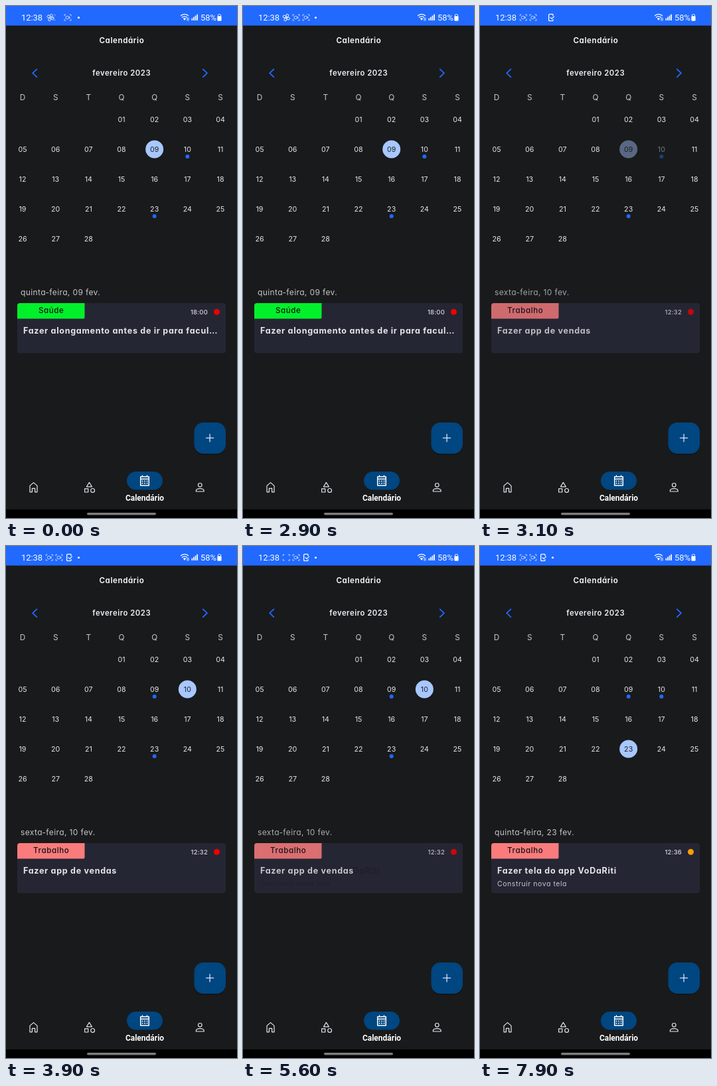
These frames come from a looping animation (348 px wide and 772 px high, 8000 ms). An HTML page:

```html
<!DOCTYPE html>
<html lang="pt">
<head>
<meta charset="utf-8">
<title>Calendário</title>
<style>
html, body { margin: 0; width: 100%; height: 100%; overflow: hidden; background: #191a1c; }
svg { display: block; width: 100vw; height: 100vh; }
text { font-family: Inter, "Open Sans", sans-serif; font-feature-settings: "cv11"; white-space: pre; }
.sys { font-family: Roboto, Arial, sans-serif; }
.line { fill: none; stroke-linecap: round; stroke-linejoin: round; }
</style>
</head>
<body>
<svg id="stage" viewBox="0 0 348 772" preserveAspectRatio="none"></svg>
<script>
const LOOP = 8000, STEP = 100;
const BLUE = '#2169ff', INK = '#e6e6ea', PILL = '#004680', SOFT = '#d6e2ff';
const stage = document.getElementById('stage');
const $ = id => document.getElementById(id);

const text = (x, y, size, s, fill = INK, more = '') =>
  `<text x="${x}" y="${y}" font-size="${size}" fill="${fill}" ${more}>${s}</text>`;
const rect = (x, y, w, h, r, fill, more = '') =>
  `<rect x="${x}" y="${y}" width="${w}" height="${h}" rx="${r}" fill="${fill}" ${more}/>`;
const circle = (x, y, r, fill, more = '') =>
  `<circle cx="${x}" cy="${y}" r="${r}" fill="${fill}" ${more}/>`;
const line = (d, color = INK, width = 1.2) =>
  `<path class="line" d="${d}" stroke="${color}" stroke-width="${width}"/>`;
const group = (id, body) => `<g id="${id}">${body}</g>`;
const mid = 'text-anchor="middle"';

const tasks = [
  { day: 9, date: 'quinta-feira, 09 fev.', tag: 'Saúde', color: '#02f02b', time: '18:00',
    dot: '#ee0000', title: 'Fazer alongamento antes de ir para facul…', note: '' },
  { day: 10, date: 'sexta-feira, 10 fev.', tag: 'Trabalho', color: '#fa7b7c', time: '12:32',
    dot: '#ee0000', title: 'Fazer app de vendas', note: '' },
  { day: 23, date: 'quinta-feira, 23 fev.', tag: 'Trabalho', color: '#fa7b7c', time: '12:36',
    dot: '#ff9d00', title: 'Fazer tela do app VoDaRiti', note: 'Construir nova tela' }
];
// Each tap moves the selection to the next task.
const taps = [2950, 5550];

const colX = i => 25 + i * 49.67;

function statusBar() {
  const corners = 'M-5 -2.6V-4.4H-3.2 M3.2 -4.4H5V-2.6 M5 2.6V4.4H3.2 M-3.2 4.4H-5V2.6';
  const camera = rect(-2.8, -2, 4.2, 4, 1, 'none', `stroke="${SOFT}" stroke-width=".9"`) +
    line('M1.6 -.4L3 -1.3V1.3L1.6 .4', SOFT, .8);
  const petal = a => `<ellipse cx="1.5" cy="-3" rx="1.8" ry="2.2" fill="none" stroke="#fff" stroke-width="1" transform="rotate(${a})"/>`;
  const bars = [0, 1, 2, 3].map(i =>
    rect(279.5 + i * 2.6, 18.5 - i * 2, 1.7, 3.2 + i * 2, .3, '#fff')).join('');
  return rect(0, 0, 348, 29.5, 0, BLUE) +
    text(23, 21.8, 12.9, '12:38', '#fff', 'class="sys"') +
    group('wheel', [0, 90, 180, 270].map(petal).join('') + circle(0, 0, .9, '#fff')) +
    group('rec', line(corners, SOFT, .9) + group('blink', camera)) +
    group('cast', line(corners, SOFT, .9) + camera) +
    group('phone', line('M3 -2.6V-4.2Q3 -5 2 -5H-2.2Q-3.4 -5 -3.4 -4V4Q-3.4 5 -2.2 5H2Q3 5 3 4.2V3', '#fff', 1.3) +
      line('M-1 0L1 2L4.6 -1.5', '#fff', 1.1)) +
    group('more', circle(109.5, 17.5, 1.6, '#fff')) +
    line('M263.5 14.6Q269 10.3 274.5 14.6 M265.4 17Q269 14.2 272.6 17', '#fff', 1.3) +
    `<path d="M266.8 18.8Q269 17.2 271.2 18.8L269 21.8Z" fill="#fff"/>` +
    line('M273 18V22 M275 22V18', '#fff', .9) + bars +
    text(293, 21.8, 13, '58%', '#fff', 'class="sys"') +
    rect(318.4, 15.2, 6.2, 7.3, 1.2, '#fff') +
    rect(319.4, 12.6, 4.2, 4, 1, 'none', 'stroke="#fff" stroke-width=".9"');
}

function calendar() {
  let out = text(174.4, 55.7, 11.6, 'Calendário', '#fff', `${mid} font-weight="600" letter-spacing=".58"`) +
    text(174.2, 105, 11.3, 'fevereiro 2023', '#f0f0f4', `${mid} font-weight="600" letter-spacing=".55"`) +
    line('M46.4 95.3L40.2 101.2L46.4 107.1', BLUE, 1.8) +
    line('M296.8 95.3L303 101.2L296.8 107.1', BLUE, 1.8);
  [...'DSTQQSS'].forEach((d, i) => out += text(colX(i), 142, 11.8, d, '#c8c8cc', mid));
  for (let d = 1; d <= 28; d++) {
    const x = colX((d + 2) % 7), y = 171 + 45 * Math.floor((d + 2) / 7);
    const label = text(x, y + 3.9, 10.7, String(d).padStart(2, '0'), INK, `${mid} id="num${d}"`);
    out += tasks.some(k => k.day === d)
      ? group('day' + d, circle(x, y, 13.5, '#a8c7fe', `id="ring${d}"`) + label +
          circle(x, y + 11, 3, BLUE, `id="mark${d}"`))
      : label;
  }
  return out;
}

const titleStyle = 'font-weight="700" letter-spacing=".72"';
const noteStyle = 'letter-spacing=".55"';

function card(k, i) {
  return group('card' + i,
    text(22, 436, 12, k.date, '#c6c6ca', 'letter-spacing=".38"') +
    `<path d="M17 471.5V452Q17 448 21 448H118.5V469.5Q118.5 471.5 116.5 471.5Z" fill="${k.color}"/>` +
    text(68.2, 463.2, 11.5, k.tag, '#101114', `${mid} font-weight="500" letter-spacing=".65"`) +
    text(304, 464.6, 9.5, k.time, '#d8d8e0', 'text-anchor="end" font-weight="500" letter-spacing=".2"') +
    circle(317.5, 461.3, 4.5, k.dot) +
    text(26, 494, 12.5, k.title, INK, titleStyle) +
    text(26, 512.6, 10.5, k.note, '#c4c5cf', noteStyle));
}

const ghost = (k, i) => group('ghost' + i,
  text(26, 494, 12.5, k.title, '#1b1c26', titleStyle) +
  text(26, 512.6, 10.5, k.note, '#1b1c26', noteStyle));

function bottomBar() {
  const dots = [0, 1, 2, 3, 4, 5].map(i =>
    rect(204.7 + (i % 3) * 3.5, 715.5 + Math.floor(i / 3) * 3.3, 1.7, 1.7, 0, '#fff')).join('');
  return rect(283.5, 630, 47.5, 47, 14, '#111214', 'opacity=".6"') +
    rect(283.5, 628, 47.5, 47, 14, PILL) +
    line('M301.5 651.3H312.7 M307.1 645.7V656.9', '#d4e4ff', 1.3) +
    line('M36 732.8V723.4L41.5 718.6L47 723.4V732.8H43.6V727.4H39.4V732.8Z') +
    line('M125.4 718.4L129.4 724.8H121.4Z M118.6 727.8H123.8V733H118.6Z') +
    circle(130.6, 730.4, 2.9, 'none', `stroke="${INK}" stroke-width="1.2"`) +
    rect(182, 702, 54, 27.5, 13.75, PILL) +
    line('M202.7 709.8H215.3V723H202.7Z M202.7 713.2H215.3 M205.5 708V709.6 M212.5 708V709.6', '#fff', 1.5) + dots +
    text(209, 746, 12, 'Calendário', '#fff', `${mid} class="sys" font-weight="700"`) +
    circle(292.3, 722.3, 2.8, 'none', `stroke="${INK}" stroke-width="1.2"`) +
    line('M286.4 732V730.6Q286.8 727.6 292.3 727.6Q297.8 727.6 298.2 730.6V732Z') +
    rect(0, 759, 348, 13, 0, '#000') + rect(122, 764, 104, 3.4, 1.7, '#7c7c7c');
}

stage.innerHTML = rect(0, 0, 348, 772, 0, '#191a1c') + calendar() +
  rect(17, 448, 314, 75.5, 4, '#252633') +
  tasks.map(ghost).join('') + tasks.map(card).join('') + bottomBar() + statusBar();

const clamp = v => Math.max(0, Math.min(1, v));
const ramp = (t, a, b) => clamp((t - a) / (b - a));
const mix = (a, b, k) => a + (b - a) * k;
const fade = (id, v) => $(id).setAttribute('opacity', v);
const place = (id, x) => $(id).setAttribute('transform', `translate(${x} 17.4)`);

function drawStatus(t) {
  const enter = 1 - (1 - ramp(t, 0, 500)) ** 2;
  const leave = ramp(t, 2900, 3100);
  const push = ramp(t, 3100, 3300);
  place('wheel', mix(67, 65.3, enter));
  fade('wheel', mix(.8, 1, enter) * (1 - leave));
  place('rec', mix(mix(69, 80, enter), 65.3, leave));
  fade('rec', mix(.5, 1, enter));
  place('cast', mix(mix(93, 95, enter), 80, leave));
  place('phone', mix(107, 95, push));
  fade('phone', ramp(t, 2950, 3100));
  fade('more', t >= 3000 && t < 3300 ? 0 : 1);
  fade('blink', Math.floor((t + 100) / 500) % 2 ? 0 : 1);
}

function drawTasks(t) {
  const tap = t >= taps[1] ? 1 : 0;
  const age = t - taps[tap];
  const shown = tap + (age >= 100 ? 1 : 0);
  const picked = tap + (age >= 200 ? 1 : 0);
  const alpha = age < 100 ? mix(1, .7, ramp(age, 0, 100)) : mix(.6, 1, ramp(age, 100, 200));
  tasks.forEach((k, i) => {
    fade('card' + i, i === shown ? alpha : 0);
    fade('ghost' + i, i === tap + 1 && age >= 0 && age < 100 ? .6 : 0);
    const on = i === picked;
    let a = 1;
    if (age >= 100 && age < 350 && (i === tap || i === tap + 1)) {
      a = mix(.45, 1, ramp(age, 200, 350));
    }
    fade('day' + k.day, a);
    fade('ring' + k.day, on ? 1 : 0);
    fade('mark' + k.day, on ? 0 : 1);
    $('num' + k.day).setAttribute('fill', on ? '#1b2230' : INK);
  });
}

function draw(ms) {
  const t = Math.floor((ms % LOOP) / STEP) * STEP;
  drawStatus(t);
  drawTasks(t);
}

const start = performance.now();
function tick() {
  draw(Math.max(0, performance.now() - start));
  requestAnimationFrame(tick);
}
tick();
</script>
</body>
</html>
```
